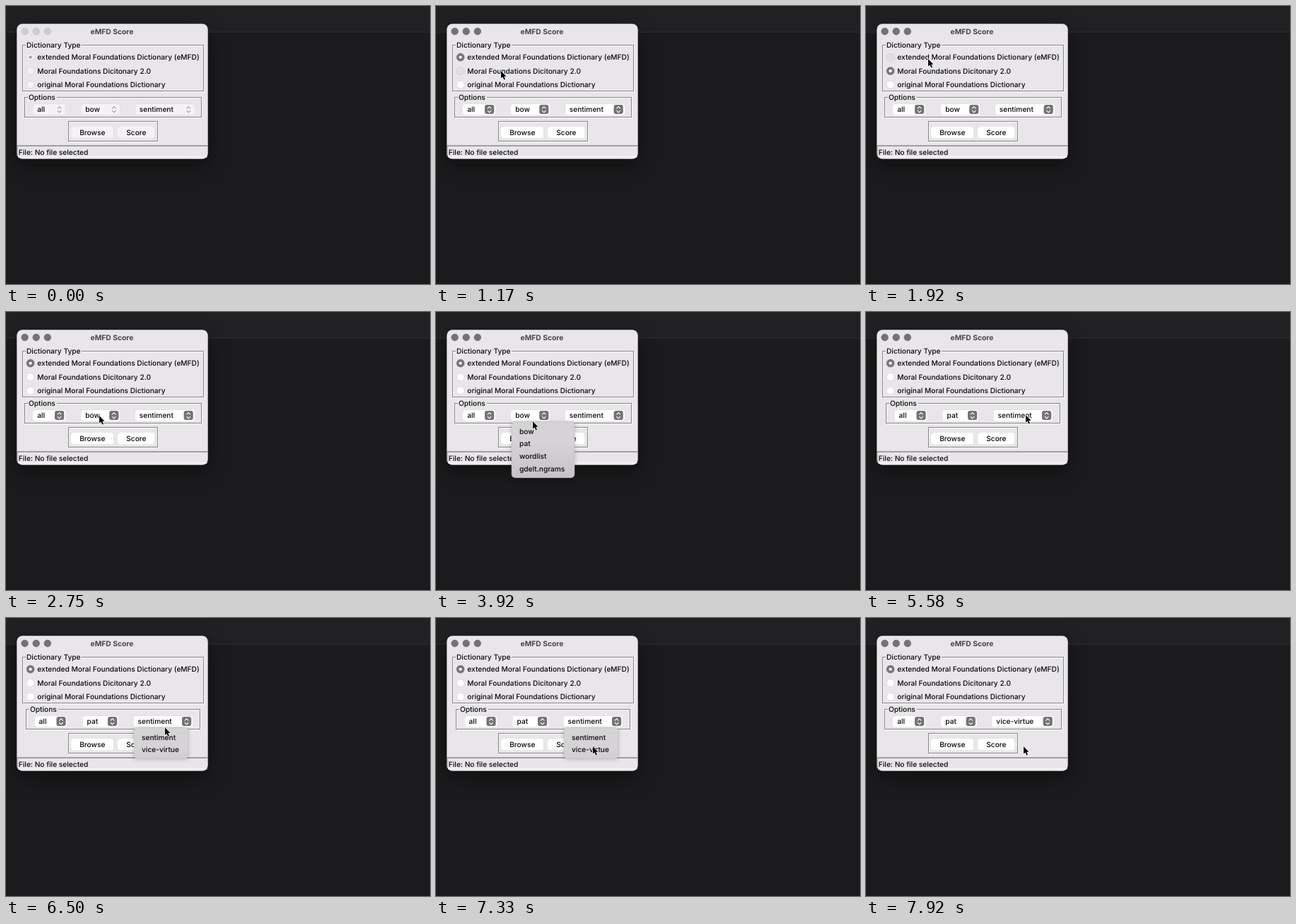
Animation, 600 px wide and 394 px high, one loop 8 s. Source, as an HTML page:

```html
<!DOCTYPE html>
<html lang="en">
<head>
<meta charset="utf-8">
<title>eMFD Score</title>
<style>
  html, body { margin: 0; width: 100%; height: 100%; overflow: hidden; background: #1b1a1c; }
  svg { display: block; }
  text { font: 500 10.16px Inter, "Open Sans", sans-serif; text-rendering: geometricPrecision; fill: #080708; white-space: pre; }
  .title { font-weight: 700; font-size: 10.3px; fill: #484648; }
  .window { filter: drop-shadow(0 9px 14px rgba(0, 0, 0, .4)); }
  .control { filter: drop-shadow(0 .5px .6px rgba(0, 0, 0, .28)); }
  .menu { filter: drop-shadow(0 1px 3px rgba(0, 0, 0, .18)); }
</style>
</head>
<body>
<svg id="stage" width="600" height="394" viewBox="0 0 600 394"></svg>
<script>
const LOOP = 8000, STEPS_PER_MS = 0.012;
const WINDOW_BG = '#e8e6e9', ACCENT = '#747274';
const stage = document.getElementById('stage');

// Pointer stops: step, x, y
const pointerPath = [
  [4, 269, 361], [13, 91, 91], [16, 91, 91], [21, 87, 74], [27, 87, 74],
  [33, 131, 146], [37, 128, 143], [38, 128, 143], [39, 127, 143], [43, 127, 143],
  [47, 136, 154], [53, 144, 184], [59, 144, 184], [65, 226, 145], [66, 226, 145],
  [67, 225, 145], [75, 225, 145], [84, 221, 181], [94, 221, 181], [95, 222, 181]
];

// Frame edges and [left, right, label] of each popup button
const layouts = {
  bow: { left: 26, right: 278, popups: [[38, 84.4, 'all'], [106, 161.6, 'bow'], [182.5, 267, 'sentiment']] },
  pat: { left: 28, right: 276, popups: [[40.3, 86.8, 'all'], [108.3, 159.4, 'pat'], [180.3, 264.4, 'sentiment']] },
  virtue: { left: 26, right: 278, popups: [[38, 84.4, 'all'], [106, 157, 'pat'], [178, 266, 'vice-virtue']] }
};

const menus = [
  { open: 41, click: 56, left: 107, right: 196, items: ['bow', 'pat', 'wordlist', 'gdelt.ngrams'] },
  { open: 71, click: 88, left: 181, right: 258, items: ['sentiment', 'vice-virtue'] }
];
const ROW = 17.8, MENU_TOP = 155.7;

function pointerAt(step) {
  const i = pointerPath.findIndex(p => p[0] >= step);
  const [n1, x1, y1] = pointerPath[i];
  if (i === 0) return { x: x1, y: y1 };
  const [n0, x0, y0] = pointerPath[i - 1];
  const k = (step - n0) / (n1 - n0), e = k * k * (3 - 2 * k);
  return { x: x0 + (x1 - x0) * e, y: y0 + (y1 - y0) * e };
}

const text = (x, y, label, attrs = '') => `<text x="${x}" y="${y}" ${attrs}>${label}</text>`;
const rect = (x, y, w, h, fill, attrs = '') =>
  `<rect x="${x}" y="${y}" width="${w}" height="${h}" fill="${fill}" ${attrs}/>`;
const circle = (x, y, r, fill, attrs = '') => `<circle cx="${x}" cy="${y}" r="${r}" fill="${fill}" ${attrs}/>`;

function groove(left, top, right, bottom, label, labelWidth) {
  const w = right - left - 2, h = bottom - top - 2;
  const lines = rect(left + 1.5, top + 1.5, w, h, 'none', 'stroke="#fbf9fb"') +
    rect(left + .5, top + .5, w, h, 'none', 'stroke="#858385"');
  return label
    ? lines + rect(left + 5, top - 4, labelWidth, 9, WINDOW_BG) + text(left + 6, top + 3.8, label)
    : lines;
}

function radio(y, label, { selected, pressed, active }) {
  const fill = selected && active ? ACCENT : pressed ? '#e2dfe2' : active ? '#fff' : '#f3f1f3';
  return circle(34.6, y, 5.5, fill, `stroke="${selected && active ? ACCENT : '#c2bfc2'}" stroke-width=".5"`) +
    (selected ? circle(34.6, y, 2.2, active ? '#fff' : '#a3a1a3') : '') +
    text(44.3, y + 3.7, label);
}

const face = (left, top, width, height, active) =>
  rect(left, top, width, height, active ? '#fff' : '#f4f2f4', 'rx="3.8" class="control"');

function popup([left, right, label], active) {
  const x = right - 8.8;
  return face(left, 138.7, right - left, 16, active) + text(left + 6.3, 150.4, label) +
    (active ? rect(x - 6.6, 140.1, 13.2, 13, ACCENT, 'rx="3"') : '') +
    `<path d="M${x - 2.4} 145.1l2.4 -2.5l2.4 2.5m0 3.3l-2.4 2.5l-2.4 -2.5" fill="none"
      stroke="${active ? '#fff' : '#9f9d9f'}" stroke-width="1.15" stroke-linecap="round" stroke-linejoin="round"/>`;
}

const button = (left, width, label, active) =>
  face(left, 171, width, 16.8, active) + text(left + width / 2, 183, label, 'text-anchor="middle"');

function menu({ open, click, left, right, items }, step, pointer) {
  // The chosen row blinks once on click, then the menu fades away
  const opacity = Math.min(1, 1 - (step - click - 1) / 4);
  if (step < open || opacity <= 0) return '';
  const top = MENU_TOP + 4;
  const hovered = step === click ? -1 : step > click ? 1 : Math.floor((pointer.y + 1 - top) / ROW);
  const rows = items.map((item, i) => {
    const on = i === hovered, y = top + i * ROW;
    return (on ? rect(left + 3.7, y, right - left - 7.6, ROW, '#858385', 'rx="3"') : '') +
      text(left + 11, y + 12.8, item, on ? 'style="fill:#fff"' : '');
  }).join('');
  return `<g opacity="${opacity}">` +
    rect(left, MENU_TOP, right - left, items.length * ROW + 8, 'url(#menuFill)',
      'rx="5" stroke="#b9b7b9" stroke-width=".5" class="menu"') + rows + '</g>';
}

const cursor = ({ x, y }) => `<path transform="translate(${x + 1} ${y + 1})"
  d="M0 0V10.6L2.4 8.4L4.3 12.4L6 11.7L4.2 7.7H7.5Z" fill="#000" stroke="#fff"
  stroke-width="1.2" stroke-linejoin="round" paint-order="stroke"/>`;

function draw(step) {
  const active = step >= 14;
  const chosen = step >= 15 && step < 24 ? 1 : 0;
  const pressed = step === 14 ? 1 : step === 22 || step === 23 ? 0 : -1;
  const layout = step < 60 ? layouts.bow : step < 92 ? layouts.pat : layouts.virtue;
  const pointer = pointerAt(step);
  const dictionaries = [
    'extended Moral Foundations Dictionary (eMFD)',
    'Moral Foundations Dicitonary 2.0',
    'original Moral Foundations Dictionary'
  ];

  // The translucent menu darkens where it hangs below the window
  stage.innerHTML = `<defs><linearGradient id="menuFill" gradientUnits="userSpaceOnUse" x1="0" x2="0" y1="185" y2="235">
      <stop stop-color="#d5d3d5"/><stop offset="1" stop-color="#c5c3c5"/>
    </linearGradient></defs>` +
    rect(0, 0, 600, 394, '#1b1a1c') + rect(0, 0, 600, 37, '#212022') + rect(0, 36.5, 600, 1, '#333234') +
    rect(15.3, 25.2, 270.4, 191.6, WINDOW_BG, 'rx="8" class="window"') +
    [26.6, 42.7, 58.8].map(x => circle(x, 36, 4.9, active ? ACCENT : '#cfcccf',
      `stroke="${active ? '#6b696b' : '#bfbcbf'}" stroke-width=".5"`)).join('') +
    text(150, 39.6, 'eMFD Score', 'class="title" text-anchor="middle"') +
    groove(23, 55, 281, 122, 'Dictionary Type', 79) +
    dictionaries.map((label, i) => radio(72.6 + i * 19.45, label,
      { selected: i === chosen, pressed: i === pressed, active })).join('') +
    groove(layout.left, 129, layout.right, 159, 'Options', 41) +
    layout.popups.map(p => popup(p, active)).join('') +
    groove(88, 163, 216, 193) +
    button(92, 60.5, 'Browse', active) + button(158, 52.7, 'Score', active) +
    rect(15.5, 197.5, 270, 1.2, '#757375') + rect(15.5, 198, 1, 15, '#858385') +
    rect(17, 213, 267.5, 1.5, '#f8f6f8') +
    text(17.8, 211.2, 'File: No file selected') +
    menus.map(m => menu(m, step, pointer)).join('') +
    (step >= 4 ? cursor(pointer) : '');
}

let shown = -1;
function tick(now) {
  const step = Math.min(95, Math.floor((now % LOOP + 5) * STEPS_PER_MS));
  if (step !== shown) draw(shown = step);
  requestAnimationFrame(tick);
}
tick(performance.now());
</script>
</body>
</html>
```
